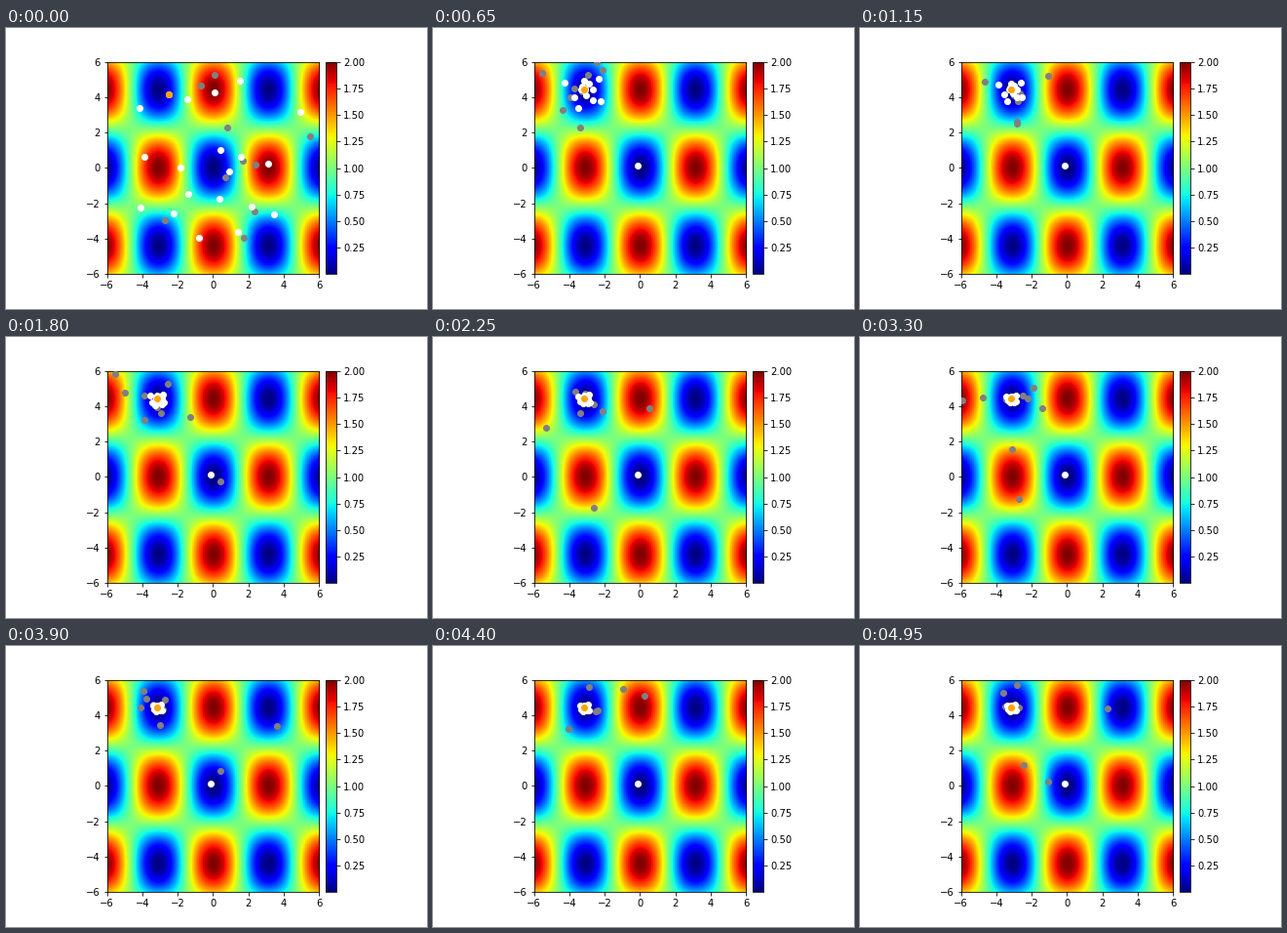
A matplotlib script that plays this animation: 432x288 px, repeating every 5000 ms.

```python
import numpy as np
import matplotlib.pyplot as plt
from matplotlib.animation import FuncAnimation
from mpl_toolkits.axes_grid1 import make_axes_locatable

plt.rcParams.update({"font.family": "DejaVu Sans", "font.size": 10})

FRAMES = 100
LIMIT = 6
NESTS = 20
FLIGHTS = 10
HOLD = 9                                    # frames between two moves of a nest
HOME = np.array([-np.pi, np.pi * np.sqrt(2)])

rng = np.random.default_rng(7)
starts = rng.uniform((-4.2, -4), (5, 5), size=(NESTS, 2))
arrivals = rng.integers(2, 13, NESTS)       # frame at which a nest finds its basin
phases = rng.integers(0, HOLD, NESTS)
angles = rng.permutation(NESTS) * 2 * np.pi / NESTS
radii = rng.uniform(0, 1.5, NESTS) ** 2
offsets = radii[:, None] * np.column_stack([np.cos(angles), np.sin(angles)])

# The first nest leads the search, the second is caught in the middle basin.
starts[:2] = (-2.53, 4.15), (0.92, -0.21)
arrivals[0] = 5
offsets[0] = 0
basins = np.tile(HOME, (NESTS, 1))
basins[1] = offsets[1] = 0
offsets[1] = (-0.12, 0.12)


def griewank(x, y):
    return 1 + (x**2 + y**2) / 4000 - np.cos(x) * np.cos(y / np.sqrt(2))


def nests_at(frame):
    """Nests hold their place, then jump inwards as the search narrows."""
    moved = np.maximum((frame + phases) // HOLD * HOLD - phases, 0)
    spread = 0.14 + 0.75 * np.exp(-moved / 15)
    spread[1] = 1
    settled = basins + offsets * spread[:, None]
    return np.where((frame >= arrivals)[:, None], settled, starts)


def flights_at(frame, nests):
    """Heavy-tailed random flights from a few of the nests."""
    local = np.random.default_rng(100 + frame)
    origins = nests[local.choice(NESTS, FLIGHTS, replace=False)]
    return origins + 0.6 * local.standard_t(1.6, size=origins.shape)


fig, ax = plt.subplots(figsize=(6, 4), dpi=72, facecolor="white")
fig.subplots_adjust(left=0.125, right=0.9, bottom=0.125, top=0.88)

grid = np.linspace(-LIMIT, LIMIT, 100)
field = ax.imshow(griewank(*np.meshgrid(grid, grid)), cmap="jet", origin="lower",
                  extent=(-LIMIT, LIMIT, -LIMIT, LIMIT))
ax.set(xlim=(-LIMIT, LIMIT), ylim=(-LIMIT, LIMIT),
       xticks=range(-6, 7, 2), yticks=range(-6, 7, 2))

cax = make_axes_locatable(ax).append_axes("right", size="5%", pad=0.1)
fig.colorbar(field, cax=cax, ticks=np.arange(0.25, 2.01, 0.25))

flight_dots = ax.scatter([], [], c="gray", zorder=3)
nest_dots = ax.scatter([], [], c="white", zorder=4)
best_dot = ax.scatter([], [], c="orange", zorder=5)


def update(frame):
    nests = nests_at(frame)
    nest_dots.set_offsets(nests)
    flight_dots.set_offsets(flights_at(frame, nests))
    best_dot.set_offsets(nests[:1])
    return flight_dots, nest_dots, best_dot


anim = FuncAnimation(fig, update, frames=FRAMES, interval=50, repeat=True,
                     repeat_delay=0)
plt.show()
```
